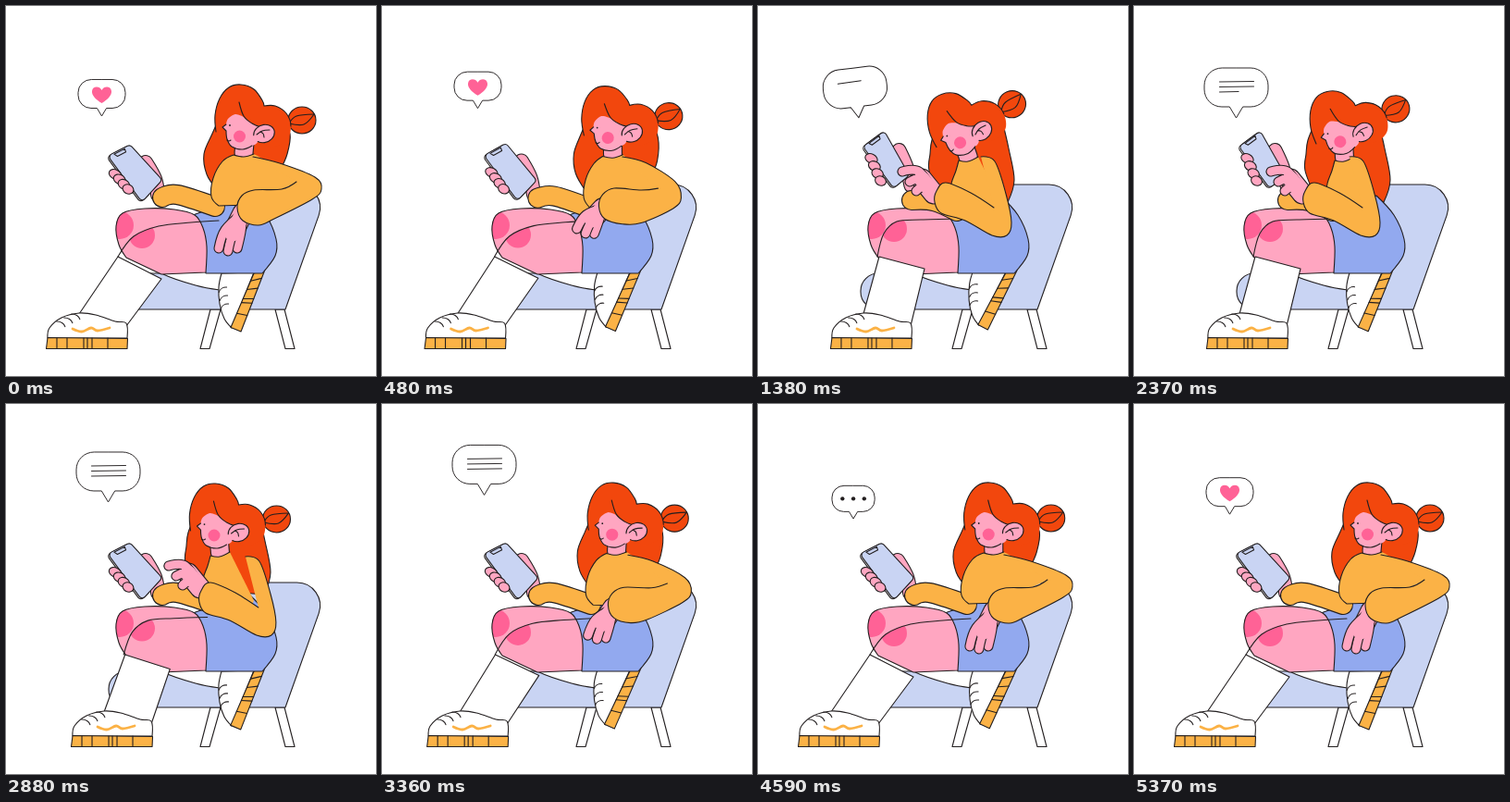
An HTML page with a canvas that plays this animation: 400x400 px, repeating every 5.4 s.

```html
<!DOCTYPE html>
<html lang="en">
<head>
<meta charset="utf-8">
<title>Chatting in an armchair</title>
<style>
  html, body { margin: 0; width: 100%; height: 100%; overflow: hidden; background: #fff; }
  canvas { display: block; width: 400px; height: 400px; }
</style>
</head>
<body>
<canvas id="stage"></canvas>
<script>
const LOOP = 5400;
const INK = '#231f20', WHITE = '#fff', SKIN = '#ffa6c1', ROSE = '#ff6296',
      HAIR = '#f2470d', KNIT = '#fbb246', DENIM = '#92a9ef', SOFT = '#c9d4f3';

const canvas = document.getElementById('stage');
const g = canvas.getContext('2d');
const dpr = window.devicePixelRatio || 1;
canvas.width = canvas.height = 400 * dpr;

const unit = (t, a, b) => Math.min(1, Math.max(0, (t - a) / (b - a)));
const ease = (t, a, b) => { const u = unit(t, a, b); return u * u * (3 - 2 * u); };
const lerp = (a, b, u) => a + (b - a) * u;

// "x,y" is a smooth point, "x,y!" a corner
const parse = s => s.trim().split(/\s+/).map(p => {
  const [x, y] = p.replace('!', '').split(',').map(Number);
  return { x, y, c: p.endsWith('!') };
});
// Shape that moves from a relaxed pose (u = 0) to a typing pose (u = 1)
function morph(relaxed, typing) {
  const a = parse(relaxed), b = parse(typing);
  return (u, dx = 0, dy = 0) => a.map((p, i) =>
    ({ x: lerp(p.x, b[i].x, u) + dx, y: lerp(p.y, b[i].y, u) + dy, c: p.c }));
}

const fold = morph('121,271 138,249 165,238 200,234 230,232', '129,271 136,246 150,233 176,231 214,230');
const sleeve = morph('169,207 185,204 226,217', '166,210 190,211 215,222');
const torso = morph(
  '262,215! 230,216! 222,206 224,186 234,168 246,161! 257,163 268,160! 320,188!',
  '256,240! 213,228! 207,212 209,192 214,178 217,167! 227,168 238,163! 264,215!');
const arm = morph(
  '267,163 296,170 334,185 341,198 331,209 290,230 273,237 256,232 250,218 255,205 268,199 298,198 314,190',
  '239,163 254,168 266,203 272,234 267,248 251,248 222,232 196,224 189,212 191,200 201,191 228,202 253,218');
const mane = morph(
  '233,116 223,138 214,160 217,182 228,198! 296,178! 304,160 307,138 297,120',
  '196,126 188,145 186,160 185,178 196,206! 270,212! 277,188 271,154 264,124');
const phone = morph('109,162 133,150 168,188 146,212', '110,160 133,143 160,191 143,205');
const grip = morph('118,182 132,198', '120,173 130,197');
const thumb = morph('151,169 161,187 164,204', '150,162 158,180 163,200');
const wrist = morph('256,224', '188,203');
const fingers = [
  morph('230,262 237,242', '154,179 172,179'),
  morph('240,265 245,246', '162,190 175,187'),
  morph('250,262 254,244', '169,200 178,195')
];

const cap = parse(`227,136 226,118 231,100 241,88 254,85 268,90 277,102 279,108! 291,108 303,116 308,130
  303,146 285,152 262,140 240,140`);
const face = parse(`257,120! 248,117 240,122 238,128! 234,131! 238,135! 239,144 244,152 256,155 266,151!
  272,147 277,131! 266,127`);
const thigh = parse(`204,226 182,220 150,219 126,224 119,238 122,258 130,272! 168,290! 216,288!
  217,260 213,240`);
const skirt = parse('202,226! 262,205! 281,226 292,252 291,270 277,289! 216,289!');
const upper = parse('45,359! 47,348 60,337 79,332 97,334 118,341 130,343 131,359!');
const squiggle = parse('72,349 82,352 92,348 99,351 112,348');
const backSock = parse('168,284! 240,284! 231,307! 205,302 170,290');
const backShoe = parse('233,289! 268,288! 244,348! 236,338 231,322 230,304');

// Spline through points; an open one may stop after `count` points
function trace(pts, closed, count = pts.length) {
  const n = pts.length;
  const tan = i => {
    if (pts[i].c || (!closed && (i === 0 || i === n - 1))) return [0, 0];
    const a = pts[(i + n - 1) % n], b = pts[(i + 1) % n];
    return [(b.x - a.x) / 6, (b.y - a.y) / 6];
  };
  g.beginPath();
  g.moveTo(pts[0].x, pts[0].y);
  for (let i = 0; i < (closed ? n : count - 1); i++) {
    const j = (i + 1) % n, p = pts[i], q = pts[j], a = tan(i), b = tan(j);
    g.bezierCurveTo(p.x + a[0], p.y + a[1], q.x - b[0], q.y - b[1], q.x, q.y);
  }
  if (closed) g.closePath();
}
function fill(color) { g.fillStyle = color; g.fill(); }
function ink(color) { fill(color); g.stroke(); }
function blob(pts, color) { trace(pts, true); ink(color); }
function partial(pts, color, count) {
  trace(pts, false);
  fill(color);
  trace(pts, false, count);
  g.stroke();
}
function curve(pts) { trace(pts, false); g.stroke(); }
function tube(pts, width, color, outline = true) {
  g.save();
  trace(pts, false);
  if (outline) { g.lineWidth = width + 1.1; g.stroke(); }
  g.lineWidth = width - 1.1;
  g.strokeStyle = color;
  g.stroke();
  g.restore();
}
function seg(x1, y1, x2, y2) {
  g.beginPath(); g.moveTo(x1, y1); g.lineTo(x2, y2); g.stroke();
}
function poly(color, ...xy) {
  g.beginPath();
  for (let i = 0; i < xy.length; i += 2) g.lineTo(xy[i], xy[i + 1]);
  g.closePath();
  ink(color);
}
function oval(x, y, rx, ry, rot = 0, from = 0, to = 7) {
  g.beginPath(); g.ellipse(x, y, rx, ry, rot, from, to);
}
function dot(x, y, r, color) { oval(x, y, r, r); fill(color); }
function turned(x, y, deg, paint) {
  g.save();
  g.translate(x, y);
  g.rotate(deg * Math.PI / 180);
  paint();
  g.restore();
}

function drawChair() {
  poly(WHITE, 221, 328, 210, 370.5, 220, 370.5, 232, 328);
  poly(WHITE, 291, 328, 302, 370.5, 312, 370.5, 301, 328);
  g.beginPath();
  g.moveTo(250, 193);
  g.arcTo(350, 193, 302, 328, 25);
  g.lineTo(302, 328);
  g.arcTo(111, 328, 111, 289, 19);
  g.arcTo(111, 289, 250, 289, 19);
  g.lineTo(250, 289);
  g.closePath();
  ink(SOFT);
}

function drawBackLeg(t) {
  blob(backSock, WHITE);
  turned(274, 287, 5 * Math.sin(Math.PI * t / 2700) ** 2, () => {
    g.translate(-274, -287);
    blob(backShoe, WHITE);
    poly(KNIT, 268, 289, 280, 285, 254, 352, 243, 347.5);
    for (const u of [0.14, 0.3, 0.47, 0.54, 0.74])
      seg(268 - 25 * u, 289 + 58.5 * u, 280 - 26 * u, 285 + 67 * u);
    for (let k = 0; k < 3; k++) {
      oval(238 + k, 311 + k * 9, 8, 7, 0, -2.9, -1.5);
      g.stroke();
    }
  });
}

function drawFrontLeg(m) {
  const line = fold(m.stride);
  g.save();
  trace(thigh, true);
  fill(SKIN);
  g.clip();
  dot(123, 237, 15, ROSE);
  trace([...line, ...parse('217,292! 171,292!')], true);
  fill(SKIN);
  g.clip();
  dot(147, 248 - 7 * m.stride, 14, ROSE);
  g.restore();
  trace(thigh, true);
  g.stroke();
  curve(line);

  const s = m.stride, step = 35 * s;
  poly(WHITE, 121 + 10 * s, 271, 168 + 12 * s, 295 - 11 * s, 130 + step, 346, 79 + step, 333);
  g.save();
  g.translate(step, 0);
  blob(upper, WHITE);
  poly(KNIT, 45, 358.5, 131.5, 359.5, 131, 370.5, 43.5, 370.5);
  for (const x of [55, 66, 84, 88, 93, 110]) seg(x, 359, x, 370);
  for (let k = 0; k < 3; k++) {
    oval(55 + k * 8, 348 - k * 4, 9, 7, 0, -1.6, -0.2);
    g.stroke();
  }
  g.strokeStyle = KNIT;
  g.lineWidth = 2.8;
  curve(squiggle);
  g.restore();
}

function drawHead(m) {
  turned(m.ear.x, m.ear.y, m.nod, () => {
    g.translate(-279, -138);
    oval(320, 123.5, 15, 14.5);
    ink(HAIR);
    for (const mid of ['314,119', '322,128']) curve(parse(`306,127 ${mid} 333,117`));
    partial(cap, HAIR, 11);
    trace(face, true);
    fill(SKIN);
    trace(face.slice(3), false, 7);
    g.stroke();
    curve(parse('252,104 257,119 266,127 276,131'));
    dot(252.5, 141, 6.5, ROSE);
    dot(242, 129, 0.9, INK);
    curve(parse('239,145 241,146 243,145'));
    oval(279, 138, 11.5, 9.5, -0.35);
    fill(SKIN);
    oval(279, 138, 11.5, 9.5, -0.35, -2.9, 2.5);
    g.stroke();
    curve(parse('271,139 277,135 285,134'));
    curve(parse('275,136 278,138 279,142'));
  });
}

function drawPhone(m) {
  const dx = 2.5 * m.lift, dy = -8 * m.lift;
  const pts = phone(m.hold, dx, dy);
  const slab = (ox, oy, color) => {
    g.save();
    g.translate(ox, oy);
    g.beginPath();
    g.moveTo((pts[0].x + pts[1].x) / 2, (pts[0].y + pts[1].y) / 2);
    for (let i = 1; i < 5; i++) {
      const p = pts[i % 4], q = pts[(i + 1) % 4];
      g.arcTo(p.x, p.y, q.x, q.y, 4);
    }
    g.closePath();
    ink(color);
    g.restore();
  };
  slab(-0.3, 1, WHITE);
  slab(1, 0, SOFT);
  const [a, b, , d] = pts;
  const on = (u, v) => [lerp(a.x, b.x, u) + (d.x - a.x) * v, lerp(a.y, b.y, u) + (d.y - a.y) * v];
  poly(SOFT, ...on(0.28, 0.03), ...on(0.34, 0.09), ...on(0.72, 0.09), ...on(0.76, 0.03));
  const [p, q] = grip(m.hold, dx, dy);
  for (let k = 0; k < 4; k++) {
    oval(lerp(p.x, q.x, k / 3), lerp(p.y, q.y, k / 3), 7 - k * 0.3, 5, 0.45);
    ink(SKIN);
  }
}

function drawHand(m, t) {
  const tap = t > 930 && t < 2370 ? 1.2 * Math.sin((t - 930) / 90 * Math.PI) : 0;
  const dx = m.armX + 2 * m.sit, dy = m.armY - 6 * m.sit + tap;
  const base = wrist(m.reach, dx, dy)[0];
  const rays = fingers.map(f => f(m.reach, dx, dy));
  const palm = [rays[1][1], base];
  tube(palm, 22, SKIN);
  for (const ray of rays.reverse()) tube([...ray, base], 10, SKIN);
  tube(palm, 18, SKIN, false);
}

// Tail tip at (x, tip); scale s
function bubble(x, tip, s, w, h, tail, tilt, content) {
  if (s < 0.02) return;
  w *= s; h *= s; tail *= s;
  const r = h * 0.45, b = tail * 0.6;
  turned(x, tip - tail - h / 2, tilt, () => {
    g.lineWidth = 0.95;
    g.beginPath();
    g.moveTo(0, -h / 2);
    g.arcTo(w / 2, -h / 2, w / 2, h / 2, r);
    g.arcTo(w / 2, h / 2, 0, h / 2, r);
    g.lineTo(b, h / 2);
    g.lineTo(0, h / 2 + tail);
    g.lineTo(-b, h / 2);
    g.arcTo(-w / 2, h / 2, -w / 2, 0, r);
    g.arcTo(-w / 2, -h / 2, 0, -h / 2, r);
    g.closePath();
    ink(WHITE);
    g.scale(s, s);
    content();
  });
}

function drawMessage(t) {
  const size = ease(t, 700, 1000) - ease(t, 3620, 3760);
  const tilt = -7 * (ease(t, 930, 1380) - ease(t, 1380, 2370));
  const tip = 132 - 11 * ease(t, 930, 1380) - 15 * ease(t, 2370, 2880) - 12 * unit(t, 2880, 3640);
  bubble(110.5 + 0.8 * tilt, tip, size, 69, 42, 12, tilt, () => {
    let left = (t - 1020) * 0.07;
    for (let y = -6; y < 6 && left > 0; y += 5.5, left -= 37)
      seg(-18, y, Math.min(37, left) - 18, y - 0.5);
  });
}

function drawReply(t) {
  const age = (t - 3800 + LOOP) % LOOP;
  const pop = 1 - (1 - unit(age, 0, 280)) ** 3;
  const size = 0.86 * pop + 0.14 * ease(age, 300, 1600) - ease(age, 2270, 2390);
  const tip = 129 - age / 160 - Math.max(0, age - 1600) / 90;
  bubble(99 + 4.5 * size, tip, size, 51, 31, 8.5, 0, () => {
    const beat = ease(age, 950, 1150);
    if (!beat) {
      for (const k of [-1, 0, 1]) dot(k * 13, 0, 2.4, INK);
      return;
    }
    g.scale(beat, beat);
    g.beginPath();
    g.moveTo(0, 10);
    g.bezierCurveTo(-7, 6, -11, 1, -10.5, -3);
    g.bezierCurveTo(-10, -8.5, -2.5, -9, 0, -4);
    g.bezierCurveTo(2.5, -9, 10, -8.5, 10.5, -3);
    g.bezierCurveTo(11, 1, 7, 6, 0, 10);
    fill(ROSE);
  });
}

// All body motion as a few eased amounts
function motion(t) {
  const reach = ease(t, 250, 950) - ease(t, 2900, 3500);
  const stride = ease(t, 300, 1400) - ease(t, 2550, 3620);
  const hold = ease(t, 300, 900) - ease(t, 2370, 2880);
  const lift = ease(t, 950, 1380) - ease(t, 2370, 2880);
  const bend = ease(t, 1400, 2370) - ease(t, 2370, 2900);
  const sit = ease(t, 2400, 2900) - ease(t, 2900, 3500);
  const drift = 5 * (ease(t, 3900, 5370) - ease(t, 3400, 3700));
  const sway = t > 3400 ? drift : 0;
  return {
    reach, stride, hold, lift, sit, sway,
    armX: 2 * lift - 8 * bend + 20 * sit + sway * 0.4,
    armY: 2 * sit,
    bodyX: 4 * sit + sway * 0.8,
    bodyY: -3 * sit,
    nod: -20 * reach + 20 * sit - 2 * lift + 6 * bend,
    ear: {
      x: 279 - 34 * reach - 3 * lift + 5.5 * bend + 6.5 * sit + sway * 1.2,
      y: 138 - 3 * reach + 1.5 * bend + 4 * sit
    }
  };
}

function draw(t) {
  const m = motion(t);
  g.setTransform(dpr, 0, 0, dpr, 0, 0);
  g.fillStyle = WHITE;
  g.fillRect(0, 0, 400, 400);
  g.strokeStyle = INK;
  g.lineWidth = 1.1;
  g.lineJoin = g.lineCap = 'round';

  const body = torso(m.reach, m.bodyX, m.bodyY);
  const collar = { x: (body[5].x + body[7].x) / 2, y: body[6].y - 4 };
  drawChair();
  drawBackLeg(t);
  partial(mane(m.reach, 7 * m.sit - 2 * m.lift + 2 * m.reach + m.sway, -6 * m.sit), HAIR, 9);
  tube([{ x: m.ear.x - 21, y: m.ear.y + 10 }, collar], 20, SKIN);
  blob(skirt, DENIM);
  drawFrontLeg(m);
  tube(thumb(m.hold, 2.5 * m.lift, -6 * m.lift), 15, SKIN);
  tube(sleeve(m.hold), 21, KNIT);
  drawPhone(m);
  partial(body, KNIT, 8);
  drawHand(m, t);
  partial(arm(m.reach, m.armX, m.armY), KNIT, 13);
  drawHead(m);
  drawMessage(t);
  drawReply(t);
}

function tick() {
  draw(performance.now() % LOOP);
  requestAnimationFrame(tick);
}
tick();
</script>
</body>
</html>
```
